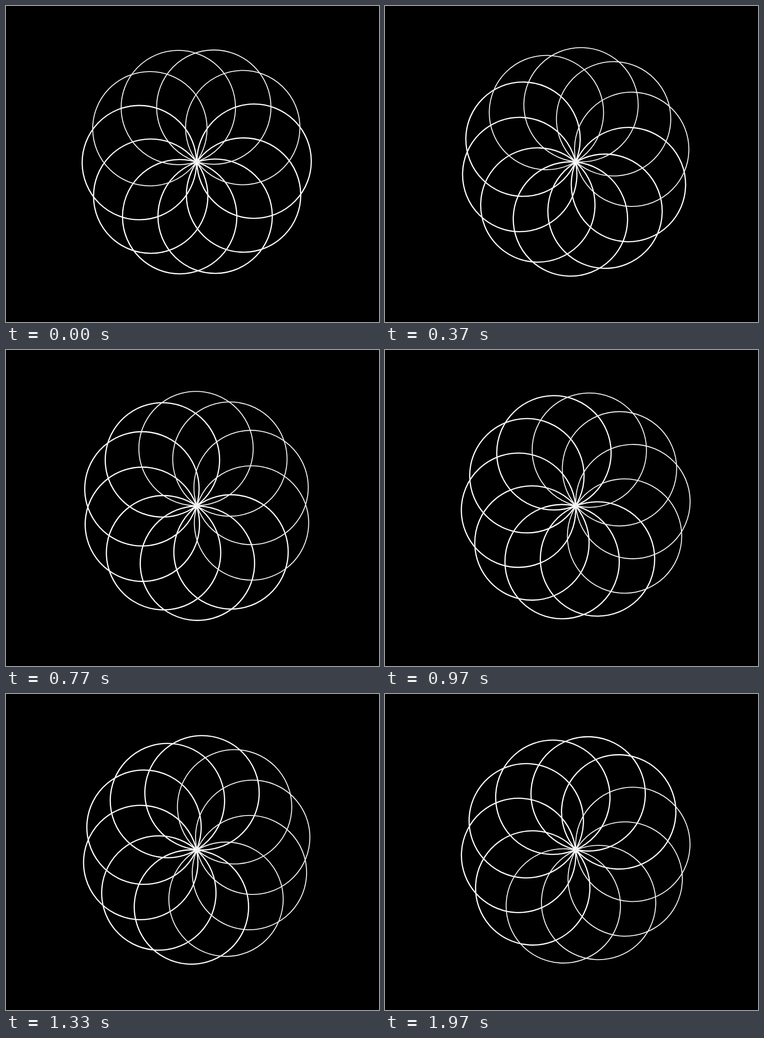
These frames come from a looping animation (813x689 px, 2010 ms). An HTML page:

```html
<!DOCTYPE html>
<html lang="en">
<head>
<meta charset="utf-8">
<title>Turning rosette</title>
<style>
  html, body { margin: 0; width: 100%; height: 100%; overflow: hidden; background: #000; }
  svg { display: block; width: 813px; height: 689px; }
  circle { fill: none; stroke: #fff; stroke-width: 2.6; }
  .thin { stroke: #f0f0f0; stroke-width: 2.1; }
</style>
</head>
<body>
<svg viewBox="0 0 813 689"><g id="rosette"></g></svg>
<script>
const LOOP = 2010;
const LAST_STEP = 59;
const PIVOT = { x: 415.7, y: 339.9 };
const RADIUS = 124.6;
const REACH = 125.1;
const PETALS = 10;
const START_ANGLE = -0.7;
const TICK_ANGLE = 1.2;

// [step, ticks turned]: the pace is slightly uneven.
const PACE = [[0, 0], [11, 20], [23, 45], [34, 67], [40, 80], [49, 99], [59, 116]];

const rosette = document.getElementById('rosette');

for (let k = 0; k < PETALS; k++) {
  const angle = k * 2 * Math.PI / PETALS;
  const petal = document.createElementNS('http://www.w3.org/2000/svg', 'circle');
  petal.setAttribute('cx', REACH * Math.cos(angle));
  petal.setAttribute('cy', REACH * Math.sin(angle));
  petal.setAttribute('r', RADIUS);
  if (k >= 6) petal.setAttribute('class', 'thin');
  rosette.appendChild(petal);
}

// Thirty steps per second, with times rounded to 10 ms.
function stepAt(ms) {
  const rounded = Math.floor(ms / 10) * 10;
  return Math.min(LAST_STEP, Math.floor((rounded + 4) * 3 / 100));
}

function ticksAt(step) {
  const next = Math.max(1, PACE.findIndex(([s]) => s >= step));
  const [s0, t0] = PACE[next - 1];
  const [s1, t1] = PACE[next];
  return Math.round(t0 + (t1 - t0) * (step - s0) / (s1 - s0));
}

function draw(ms) {
  const angle = START_ANGLE + TICK_ANGLE * ticksAt(stepAt(ms % LOOP));
  rosette.setAttribute('transform', `translate(${PIVOT.x} ${PIVOT.y}) rotate(${angle})`);
}

const start = performance.now();
function tick() {
  draw(performance.now() - start);
  requestAnimationFrame(tick);
}
tick();
</script>
</body>
</html>
```
